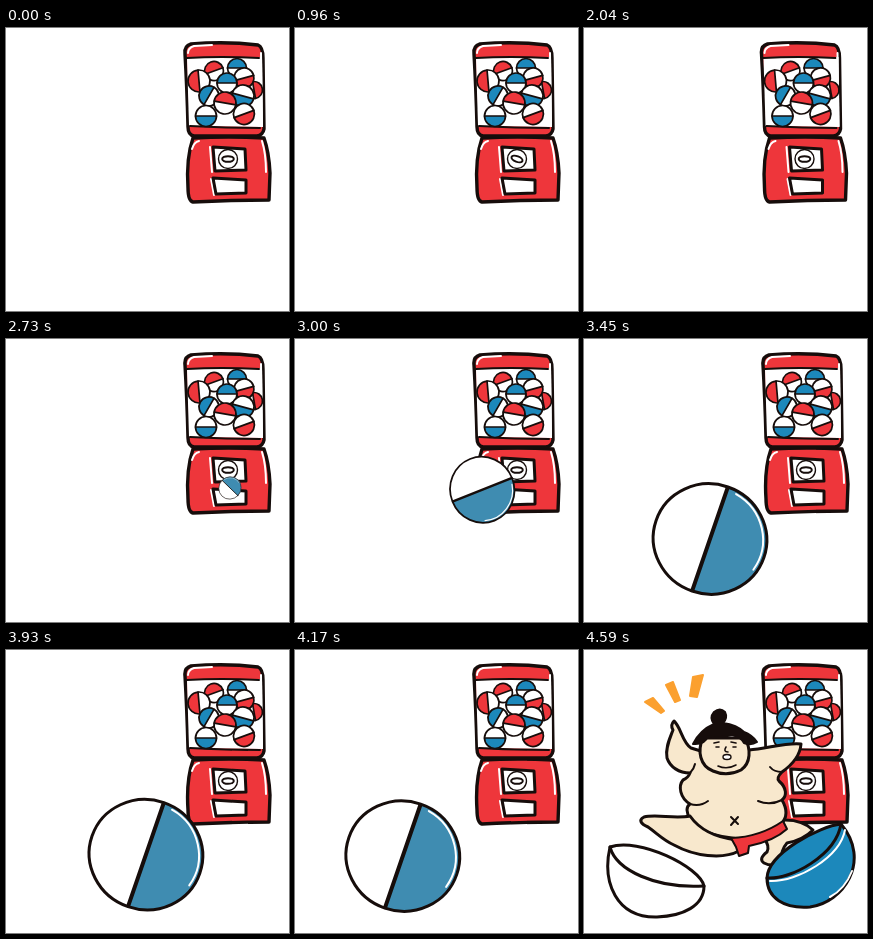
These frames come from a looping animation (283 px wide and 283 px high, 9.03 s). An HTML page:

```html
<!DOCTYPE html>
<html lang="en">
<head>
<meta charset="utf-8">
<title>Capsule machine</title>
<style>
  html, body { margin: 0; width: 100%; height: 100%; overflow: hidden; background: #fff; }
  svg { display: block; width: 100vw; height: 100vh; }
  .ink { stroke: #160d0b; stroke-width: 3; stroke-linecap: round; stroke-linejoin: round; }
  .thin { stroke-width: 2; }
  .thick { stroke-width: 3.4; }
  .red { fill: #ee363b; }
  .blue { fill: #1c88bb; }
  .white { fill: #fff; }
  .skin { fill: #f8e8cd; }
  .none { fill: none; }
  .black { fill: #160d0b; }
  .shine { fill: none; stroke: #fff; stroke-width: 2; stroke-linecap: round; }
  .rays { fill: #fba02f; stroke: #fba02f; stroke-width: 2; stroke-linejoin: round; }
</style>
</head>
<body>
<svg viewBox="0 0 283 283">
  <g id="machine">
    <!-- base -->
    <path class="ink red thick" d="M187 110Q223 108 258 110Q263 124 264 145L263 172Q225 172 187 174Q182 173 182 160Q180 130 187 110Z"/>
    <path class="shine" d="M256 113Q260 126 260 144M186 121Q188 114 193 113"/>
    <path class="shine" d="M204 119L206 144M205 151L208 167"/>
    <path class="ink white" d="M207 119L239 121L240 142L209 143Z"/>
    <path class="ink white" d="M207 150L240 152L240 165L210 166Z"/>
    <circle class="ink none" cx="222" cy="131" r="9.5" style="stroke-width:1.4"/>
    <g id="knob"><ellipse class="ink white thin" rx="5.8" ry="2.8"/></g>
    <!-- head -->
    <path class="ink red thick" d="M185 16Q220 13 252 17Q257 19 257 30L258 101Q257 107 251 108L188 108Q182 107 182 99Q181 60 179 26Q178 18 185 16Z"/>
    <path class="white" d="M181 30L256 29L257 99L183 98Z"/>
    <path class="ink none thin" d="M181 30Q215 28 253 30M184 98Q220 100 254 100"/>
    <path class="shine" d="M182 25Q182 20 188 18L206 17M255 25L256 98"/>
    <g id="balls"></g>
  </g>

  <g id="capsule">
    <ellipse class="white" rx="55" ry="57"/>
    <path d="M-55 0A55 57 0 0 1 55 0Z" fill="#3f8cb1"/>
    <path class="shine" d="M-51 -10A52 53 0 0 1 15 -51"/>
    <path class="ink none" style="stroke-width:4" d="M-54 0H54"/>
    <ellipse class="ink none" rx="55" ry="57"/>
  </g>

  <g id="sumo">
    <path class="rays" d="M61 52L69 48L80 61L77 63ZM82 35L89 32L96 50L91 52ZM109 27L119 25L113 47L106 46Z"/>
    <path class="ink skin" d="M198 170Q218 169 229 180Q219 190 203 193Q196 201 198 211Q190 218 180 213Q174 209 183 202Q186 196 180 188Z"/>
    <path class="ink skin" d="M90 71C97 77 98 92 107 98L120 102L165 100C182 99 203 92 217 94C216 108 205 117 198 122Q192 128 195 131C203 138 203 146 198 150C205 162 202 169 197 174C182 187 164 191 148 188C121 185 104 175 103 160Q103 156 106 154C96 148 94 136 99 130Q104 128 106 123C95 123 86 117 83 108C81 98 86 88 89 80Q86 75 90 71Z"/>
    <path class="ink skin" d="M106 166C91 169 72 164 60 167C54 170 57 174 64 177C74 184 79 190 90 195C110 206 138 210 155 201L152 190Q120 186 106 166Z"/>
    <path class="ink red thin" d="M147 188Q176 187 199 171L203 179Q190 191 165 196L164 203L155 206L152 197Z"/>
    <path class="ink none thin" d="M106 123Q110 119 111 114M106 154Q116 157 124 151M174 151Q186 156 198 150M198 122Q190 122 186 117M147 167L154 174M154 167L147 175"/>
    <!-- head -->
    <path class="ink skin" d="M119 88C113 101 116 116 129 121Q143 127 157 120C167 113 167 99 161 88Z"/>
    <path class="ink black thin" d="M109 94Q116 80 130 74Q125 68 130 62Q136 57 141 62Q144 68 139 73Q153 75 160 82Q168 85 173 92Q167 96 160 93Q157 87 148 85Q134 89 124 86Q121 95 109 94Z"/>
    <path class="ink none" style="stroke-width:1.6" d="M130 93L135 92M147 92L152 93M132 97L135 97M149 97L152 97M142 97Q139 102 144 102M134 116Q143 120 152 115"/>
    <ellipse class="ink white" cx="143" cy="107" rx="4" ry="2.5" style="stroke-width:1.4"/>
    <!-- opened halves -->
    <path class="ink white" d="M26 197C18 232 32 268 73 267C99 266 120 256 120 236C116 217 55 187 26 197Z"/>
    <path class="ink none" d="M26 197C32 220 72 239 120 236"/>
    <path class="ink blue" d="M183 228C183 248 200 259 226 257C259 253 288 211 257 174C236 176 184 203 183 228Z"/>
    <path class="shine" d="M186 231C214 232 256 207 261 180M268 221Q261 239 246 247"/>
    <path class="ink none" d="M183 228C207 230 252 205 257 174"/>
  </g>
</svg>
<script>
  const LOOP = 9030, STEP = 30;
  const $ = id => document.getElementById(id);
  const clamp = v => Math.min(1, Math.max(0, v));
  const { sin, PI, abs, pow } = Math;

  // x, y, radius, colour, direction of the coloured half
  const balls = [
    [208, 43, 9.5, 'red', -20], [231, 40, 9.5, 'blue', 0], [248, 62, 8.5, 'red', 80],
    [238, 50, 10, 'red', 165], [221, 55, 10, 'blue', 0], [193, 53, 11, 'red', -95],
    [203, 68, 10, 'blue', -60], [237, 68, 11, 'blue', 195], [219, 75, 11, 'red', 10],
    [200, 88, 10.5, 'blue', 180], [238, 86, 10.5, 'red', 160]
  ];
  $('balls').innerHTML = balls.map(([x, y, r, color, turn]) => `
    <g transform="translate(${x} ${y}) rotate(${turn})">
      <circle class="white" r="${r}"/>
      <path class="${color}" d="M${-r} 0A${r} ${r} 0 0 1 ${r} 0Z"/>
      <path class="ink none" style="stroke-width:1.7" d="M${-r} 0H${r}"/>
      <circle class="ink none" style="stroke-width:1.7" r="${r}"/>
    </g>`).join('');

  function place(id, x, y, turn = 0, scale = 1) {
    $(id).setAttribute('transform', `translate(${x} ${y}) rotate(${turn}) scale(${scale})`);
  }
  function show(id, visible) {
    $(id).style.display = visible ? '' : 'none';
  }

  // Tossed out along a parabola while rolling, then shaken without turning
  function drawCapsule(t) {
    const roll = clamp((t - 2730) / 720);
    const swing = clamp((t - 3705) / 615);
    const dx = 5.5 * sin(PI * swing) - 29.5 * sin(3 * PI * swing);
    place('capsule',
      224 - 98 * roll + dx,
      149 - 23 * roll + 74 * roll * roll + abs(dx) / 3,
      44 - 655 * roll,
      1 - 0.8 * pow(1 - roll, 1.38));
  }

  function draw(now) {
    const t = Math.floor(now % LOOP / STEP) * STEP;
    const rattle = clamp((t - 2010) / 450);
    place('machine', -1.5 * sin(8 * PI * rattle), 0);
    place('knob', 222, 131, 360 * clamp((t - 930) / 510));
    show('capsule', t >= 2730 && t < 4590);
    show('sumo', t >= 4590);
    drawCapsule(t);
  }

  const start = performance.now();
  function tick() {
    draw(performance.now() - start);
    requestAnimationFrame(tick);
  }
  tick();
</script>
</body>
</html>
```
